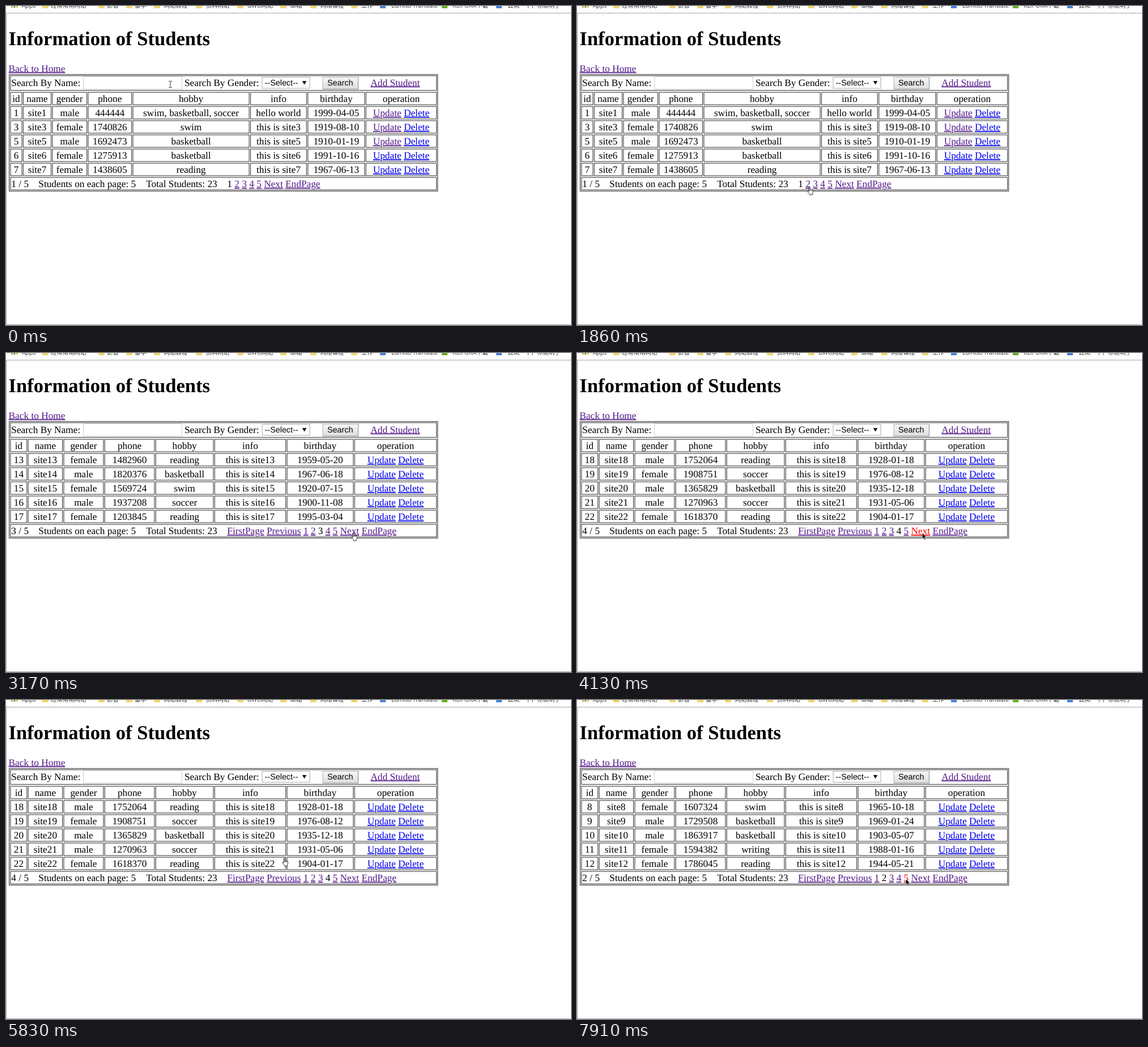
Write an HTML page that moves like this. It is 997x562 px and loops after 8 s.

```html
<!DOCTYPE html>
<html lang="en">
<head>
<meta charset="utf-8">
<title>Information of Students</title>
<style>
html, body { margin: 0; width: 100%; height: 100%; overflow: hidden; background: #fff; }
svg { display: block; width: 997px; height: 562px; }
text {
  font: 17.3px "Liberation Serif", "Times New Roman", serif;
  text-rendering: geometricPrecision;
  white-space: pre;
}
.title { font-size: 34.6px; font-weight: bold; }
.form { font: 14.35px "Liberation Sans", Arial, sans-serif; }
.bar { font: 10.4px "Open Sans", "Noto Sans CJK SC", "Noto Sans CJK", sans-serif; fill: #333; }
.mid { text-anchor: middle; }
.new, .old { text-decoration: underline; text-decoration-skip-ink: none; }
.new { fill: #00e; }
.old { fill: #551a8b; }
.press { fill: #f00; }
.cell { fill: none; stroke: #4c4c4c; stroke-width: 1.2; }
.page, .cursor { visibility: hidden; }
.on { visibility: visible; }
</style>
</head>
<body>
<svg viewBox="0 0 997 562">
  <defs>
    <linearGradient id="face" x2="0" y2="1">
      <stop stop-color="#f6f6f6"/><stop offset="1" stop-color="#dcdcdc"/>
    </linearGradient>
  </defs>
  <rect width="997" height="562" fill="#fff"/>
  <g id="bar"></g>
  <path d="M0 12.5H997M.5 12V562M0 561.5H997" stroke="#a6a6a6"/>
  <text class="title" x="4.6" y="69">Information of Students</text>
  <text class="old" x="4.6" y="115.5">Back to Home</text>

  <g id="pages"></g>

  <text x="9.3" y="140.5">Search By Name:</text>
  <rect x="136.5" y="124.5" width="174" height="22" fill="#fff" stroke="#cfcfcf"/>
  <text x="315" y="140.5">Search By Gender:</text>
  <rect x="452" y="125.5" width="84" height="19.5" fill="#fff" stroke="#a9a9a9"/>
  <text class="form" x="456.6" y="140.3">--Select--</text>
  <path d="M522.8 132.2h7.4l-3.7 6.4z"/>
  <rect x="559" y="125.5" width="62.5" height="21" fill="url(#face)" stroke="#b4b4b4"/>
  <path d="M559 146.5h62.5v-21" fill="none" stroke="#8c8c8c"/>
  <text class="form" x="567" y="140.3">Search</text>
  <text class="old" x="643.3" y="140.5">Add Student</text>

  <g class="cursor" id="beam">
    <path d="M0 .5h2.2l.8 .8 .8-.8H6M3 1v10M0 11.5h2.2l.8-.8 .8 .8H6" fill="none" stroke="#333" stroke-width="1"/>
  </g>
  <g class="cursor" id="arrow">
    <path d="M.4 .4V10.3L2.7 8.2 4.3 12 6 11.2 4.4 7.6H7.6z" stroke="#fff" stroke-width=".5"/>
  </g>
  <g class="cursor" id="hand">
    <path d="M3.3 8.6V1.5q0-1 .9-1t.9 1V5.2q1.3-.6 1.7.4 1.3-.4 1.7.5 1.6-.3 1.8 1v3.4q-.2 1.6-1.2 2.6v1.6H4.4v-1.4Q3 11.800 1 9q-.4-1.200.5-1.400 1 0 1.800 1.400z" fill="#fff" stroke="#111" stroke-width=".9" stroke-linejoin="round"/>
    <path d="M5.100 5v3M6.800 5.600v2.400M8.500 6.200v2" stroke="#111" stroke-width=".6"/>
  </g>
</svg>
<script>
const LOOP = 8000;
const $ = id => document.getElementById(id);
const text = (x, y, s, cls = '') => `<text x="${x}" y="${y}" class="${cls}">${s}</text>`;
const link = (s, cls = 'old', id = '') => `<tspan class="${cls}" id="${id}">${s}</tspan>`;
const box = (x1, y1, x2, y2) =>
  `<rect class="cell" x="${x1}" y="${y1}" width="${x2 - x1}" height="${y2 - y1}"/>`;

// Bookmarks, cut off by the top edge
const folders = [[64, '经常常用网站'], [163, '影音'], [212, '留学'], [261, ' 网站教程'], [335, ' 资料网站'],
  [408, ' GWU网站'], [484, ' 邮箱'], [537, ' 网络课程'], [609, ' 工作']];
const sites = [[660, '#4a80e0', 'Lumiso Translate', 680], [769, '#62b01e', 'KLIPORA下載', 788],
  [865, '#4a80d8', '云岚一下，你就明了', 885]];
$('bar').innerHTML =
  ['#e8a33d', '#58a55c', '#e8c23d'].map((c, i) => `<rect x="${9 + i * 4.4}" y="0" width="3" height="3" fill="${c}"/>`).join('') +
  text(28, 2.6, 'Apps', 'bar') +
  folders.map(([x, s]) => `<rect x="${x}" y="-5" width="11" height="9" rx="1" fill="#f3d36b"/>` + text(x + 15, 2.6, s, 'bar')).join('') +
  sites.map(([x, c, s, tx]) => `<rect x="${x}" y="-5" width="10" height="9" fill="${c}"/>` + text(tx, 2.6, s, 'bar')).join('');

// Left edges of the columns
const wide = [8, 30.5, 82, 145, 224, 431.5, 532.7, 635.2];
const even = [8, 39.2, 102, 174.3, 264.3, 368.3, 496, 615.2];
const last = [8, 35.5, 91, 154, 233, 419.5, 530.7, 634];
const heads = ['id', 'name', 'gender', 'phone', 'hobby', 'info', 'birthday', 'operation'];

// id | gender | phone | hobby | birthday | info | visited | name number
const pages = [
  [wide, `1|male|444444|swim, basketball, soccer|1999-04-05|hello world|v
3|female|1740826|swim|1919-08-10||v
5|male|1692473|basketball|1910-01-19||v
6|female|1275913|basketball|1991-10-16
7|female|1438605|reading|1967-06-13`],
  [even, `8|female|1607324|swim|1965-10-18
9|male|1729508|basketball|1969-01-24
10|male|1863917|basketball|1903-05-07
11|female|1594382|writing|1988-01-16
12|female|1786045|reading|1944-05-21`],
  [even, `13|female|1482960|reading|1959-05-20
14|male|1820376|basketball|1967-06-18
15|female|1569724|swim|1920-07-15
16|male|1937208|soccer|1900-11-08
17|female|1203845|reading|1995-03-04`],
  [even, `18|male|1752064|reading|1928-01-18
19|female|1908751|soccer|1976-08-12
20|male|1365829|basketball|1935-12-18
21|male|1270963|soccer|1931-05-06
22|female|1618370|reading|1904-01-17`],
  [last, `23|male|1876192|soccer|1926-05-27||v
24|female|1340769|basketball|1995-02-10
29|female|22222|swim, soccer, reading|1993-02-20|hello|v|26`]
];

function cells(line) {
  const [id, gender, phone, hobby, day, info, seen, num] = line.split('|');
  const name = 'site' + (num || id);
  return [id, name, gender, phone, hobby, info || 'this is ' + name, day,
    link('Update', seen ? 'old' : 'new') + ' ' + link('Delete', 'new')];
}

function pager(n) {
  const nums = [1, 2, 3, 4, 5].map(i => i === n ? i : link(i, 'old', `p${n}-${i}`));
  const before = n > 1 ? [link('FirstPage'), link('Previous')] : [];
  const after = n < 5 ? [link('Next', 'old', `p${n}-next`), link('EndPage')] : [];
  return [...before, ...nums, ...after].join(' ');
}

function table([left, data], i) {
  const rows = [heads, ...data.split('\n').map(cells)];
  const foot = 152 + rows.length * 25;
  let out = box(5.6, 120.600, 761.700, foot + 24.200) + box(8, 122.800, 759.600, 148.600);
  rows.forEach((row, r) => row.forEach((s, c) => {
    const y = 152 + r * 25, x = left[c], end = c < 7 ? left[c + 1] - 2.4 : 759.6;
    out += box(x, y, end, y + 22) + text((x + end) / 2, y + 17, s, 'mid');
  }));
  out += box(8, foot, 759.6, foot + 22) + text(9.3, foot + 17, `${i + 1} / 5`) +
    text(57.3, foot + 17, 'Students on each page: 5') +
    text(247.2, foot + 17, 'Total Students: 23') + text(390.3, foot + 17, pager(i + 1));
  return `<g class="page" id="page${i + 1}">${out}</g>`;
}
$('pages').innerHTML = pages.map(table).join('');

// Time, left, top
const track = {
  beam: [[0, 287, 132], [150, 225, 140], [270, 156, 160], [390, 239, 187.5], [540, 310, 262]],
  arrow: [[660, 379, 341], [810, 485, 312], [930, 446, 276], [1080, 436, 296], [1200, 428, 312],
    [2260, 495, 345], [2410, 540, 336], [2530, 584, 326],
    [4130, 609, 317], [4400, 527, 325], [4550, 494, 312], [4670, 467, 300], [4820, 458, 288],
    [4940, 474, 279], [5090, 481, 273], [7160, 525, 326], [7280, 567, 325], [7430, 573, 320], [7910, 580, 315]],
  hand: [[1350, 440, 316], [1470, 426, 319], [1590, 413, 319], [1740, 409, 318], [1860, 406, 318],
    [2110, 419, 322], [2650, 617, 316], [2770, 609, 316], [3820, 608, 316],
    [5210, 488, 269], [5830, 487, 278], [5950, 486, 288], [6100, 485, 300], [6220, 486, 312],
    [6370, 483, 315], [6490, 481, 316.500], [7550, 577, 315], [7670, 577, 314]]
};
const moves = Object.entries(track)
  .flatMap(([kind, list]) => list.map(([t, x, y]) => ({ t, x, y, kind })))
  .sort((a, b) => a.t - b.t);
const turns = [[0, 1], [2110, 2], [3170, 3], [3700, 4], [4280, 5], [5830, 4], [6610, 3], [7010, 2]];
const presses = [['p4-next', 4130, 4280], ['p2-5', 7910, LOOP]];

function draw(now) {
  const t = now % LOOP;
  const at = moves.findLast(m => m.t <= t);
  const page = turns.findLast(p => p[0] <= t)[1];
  for (let i = 1; i <= 5; i++) $('page' + i).classList.toggle('on', i === page);
  for (const kind in track) $(kind).classList.toggle('on', kind === at.kind);
  $(at.kind).setAttribute('transform', `translate(${at.x} ${at.y})`);
  for (const [id, from, to] of presses) $(id).classList.toggle('press', t >= from && t < to);
}

const start = performance.now();
function tick() {
  draw(performance.now() - start);
  requestAnimationFrame(tick);
}
tick();
</script>
</body>
</html>
```
